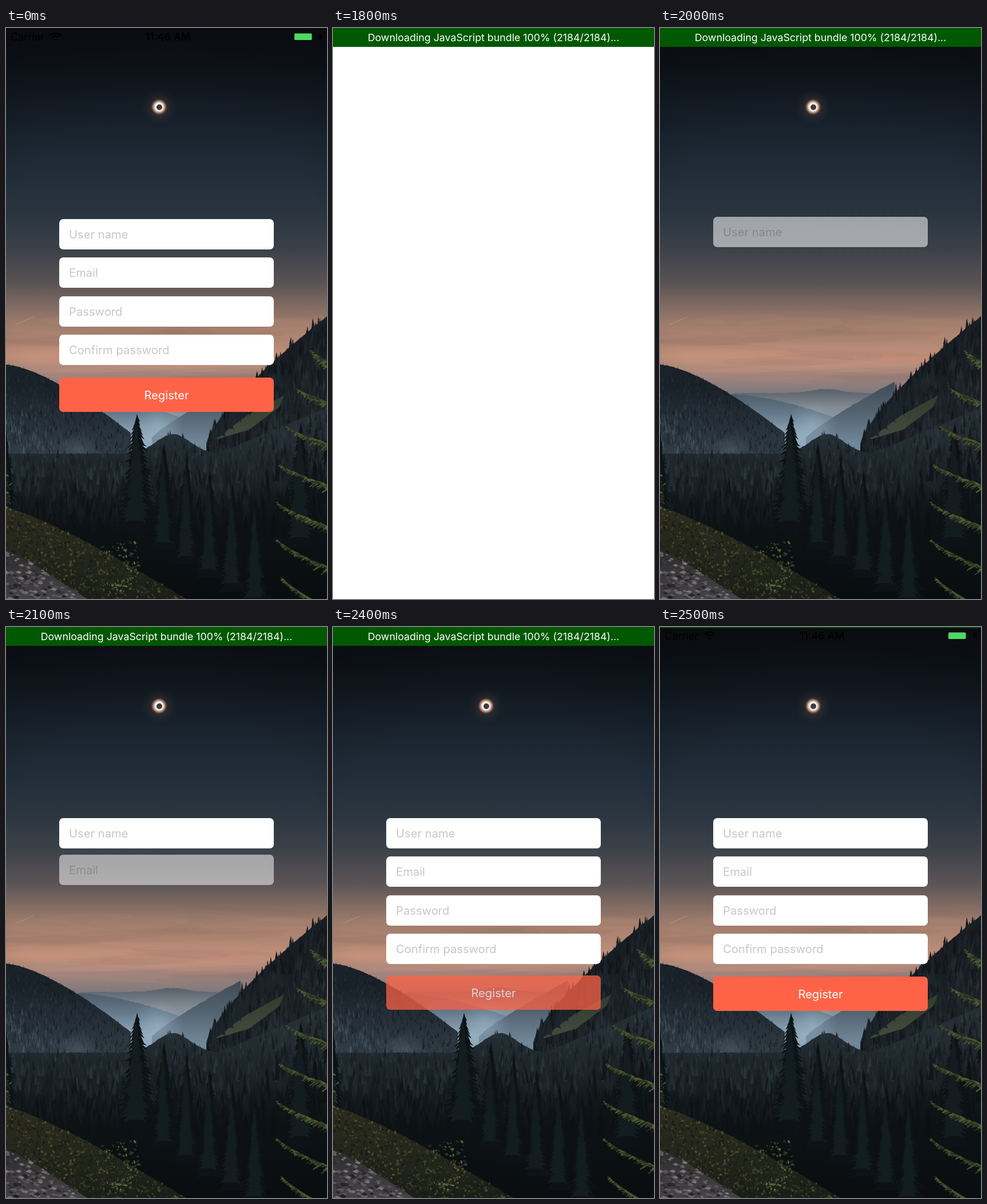
These frames come from a looping animation (561 px wide and 998 px high, 2.6 s). An HTML page with a canvas:

```html
<!DOCTYPE html>
<html lang="en">
<head>
<meta charset="utf-8">
<title>Register</title>
<style>
  html, body { margin: 0; width: 561px; height: 998px; overflow: hidden; background: #fff; }
  body { position: relative; font: 20.2px Inter, Roboto, sans-serif; }
  canvas, svg, .row, #banner { position: absolute; left: 0; top: 0; }
  .row { left: 93px; width: 375px; height: 53px; line-height: 54px; box-sizing: border-box;
    padding-left: 17px; border-radius: 7px; background: #fff; color: #c7c7cd; }
  .button { height: 60px; line-height: 61px; padding: 0; text-align: center; background: #ff6347; color: #fff; }
  #banner { width: 561px; height: 33px; line-height: 34px; text-align: center; white-space: nowrap;
    font-size: 17.8px; background: #005800; color: #fff; }
</style>
</head>
<body>
<canvas id="photo" width="561" height="998"></canvas>
<svg width="561" height="33" font-size="18">
  <text x="8" y="22">Carrier</text>
  <path d="M77 13q9.500 -8 19 0M80.500 16.500q6 -5 12 0" fill="none" stroke="#000" stroke-width="2.600"/>
  <path d="M83.500 19q3 -2.500 6 0l-3 3z"/>
  <text x="283" y="22" text-anchor="middle" font-weight="600">11:46 AM</text>
  <rect x="504" y="9.500" width="30.500" height="11.500" rx="1.500" fill="#4cd964"/>
  <path d="M551 9l-6 7h4l-2 6 7-8h-4z"/>
</svg>
<div class="row">User name</div>
<div class="row">Email</div>
<div class="row">Password</div>
<div class="row">Confirm password</div>
<div class="row button">Register</div>
<div id="banner">Downloading JavaScript bundle 100% (2184/2184)...</div>

<script>
const W = 561, H = 998, LOOP = 2600;
const photo = document.getElementById('photo');
const banner = document.getElementById('banner');
const rows = [...document.querySelectorAll('.row')];
const c = photo.getContext('2d');

let seed = 7;
const rnd = () => (seed = seed * 16807 % 2147483647) / 2147483647;
const mix = (a, b, t) => a + (b - a) * t;
const between = (a, b) => mix(a, b, rnd());
const clamp = v => Math.min(1, Math.max(0, v));
const shade = (a, b, t, k = 1) => `rgb(${a.map((v, i) => mix(v, b[i], t) * k).join()})`;

// Gradients with evenly spaced colours
function paint(gradient, colors) {
  colors.forEach((color, i) => gradient.addColorStop(i / (colors.length - 1), color));
  return gradient;
}
const vertical = (y0, y1, ...colors) => paint(c.createLinearGradient(0, y0, 0, y1), colors);

function glow(x, y, r, ...colors) {
  c.fillStyle = paint(c.createRadialGradient(x, y, 0, x, y, r), colors);
  c.fillRect(x - r, y - r, 2 * r, 2 * r);
}

function shape(points, fill) {
  c.beginPath();
  points.forEach(p => c.lineTo(...p));
  c.fillStyle = fill;
  c.fill();
}

function dot(x, y, rx, ry, turn, fill) {
  c.beginPath();
  c.ellipse(x, y, rx, ry, turn, 0, 7);
  c.fillStyle = fill;
  c.fill();
}

// A ridge is a height function over a range of x
const slope = (x0, y0, x1, y1, bend) =>
  ({ x0, x1, y: x => mix(y0, y1, clamp((x - x0) / (x1 - x0)) ** bend) });

function hill({ x0, x1, y }, fill) {
  const points = [[x1, H], [x0, H]];
  for (let x = x0; x <= x1; x += 3) points.push([x, y(x) + between(-.5, .5)]);
  shape([...points, [x1, y(x1)]], fill);
}

// Conifer with its tip at x, y
function tree(x, y, h, w, fill) {
  const n = Math.max(4, Math.round(h / 7)), left = [], right = [];
  for (let k = 1; k <= n; k++) {
    const yy = y + h * k / n;
    for (const [side, dir] of [[left, -1], [right, 1]]) {
      const r = dir * w * (k / n) ** .85 * between(.65, 1.2);
      side.push([x + r, yy + rnd() * 4], [x + r * .55, yy - 1]);
    }
  }
  shape([[x, y], ...right, ...left.reverse()], fill);
}

function forest(ridge, depth, count, size0, size1, top, low) {
  const y0 = ridge.y((ridge.x0 + ridge.x1) / 2);
  hill(ridge, vertical(y0, y0 + depth, shade(top, low, 0), shade(top, low, 1)));
  for (let i = 0; i < count; i++) {
    const t = i / count, x = between(ridge.x0, ridge.x1);
    const h = mix(size0, size1, t) * between(.6, 1.3);
    tree(x, ridge.y(x) + depth * t - h * .55, h, h * .2, shade(top, low, t, between(.6, 1.3)));
  }
}

function leaves(ridge, depth, count, dark, light) {
  for (let i = 0; i < count; i++) {
    const x = between(ridge.x0, ridge.x1);
    dot(x, ridge.y(x) + depth * rnd(), between(1, 3.5), between(1, 2), rnd() * 3, shade(dark, light, rnd() ** 2));
  }
}

// Drooping spruce branch growing in from the right edge
function branch(x, y, endY) {
  for (let i = 0; i < 150; i++) {
    const t = rnd(), px = mix(x, W + 10, t), py = mix(y, endY, t ** .8);
    const len = mix(5, 16, t) * between(.5, 1.2);
    c.strokeStyle = shade([26, 35, 27], [92, 100, 54], rnd());
    c.lineWidth = between(1, 2.2);
    c.beginPath();
    c.moveTo(px, py);
    c.lineTo(px - len * .8, py + len * between(-.5, .7));
    c.stroke();
  }
}

function sky() {
  c.fillStyle = vertical(0, 640, '#0c0d12', '#0e1219', '#131b24', '#1a2530', '#212d39',
    '#29343f', '#3a4048', '#5a5455', '#9a7a6b', '#c2917a', '#7d787c');
  c.fillRect(0, 0, W, H);
  glow(280, 420, 560, 'rgba(0,0,0,0)', 'rgba(0,0,0,0)', 'rgba(0,0,0,.26)');
  for (let i = 0; i < 30; i++) {
    const tint = rnd() < .5 ? '236,164,128' : '96,78,82';
    dot(rnd() * W, between(500, 615), between(80, 230), between(4, 12), between(-.08, .08), `rgba(${tint},.045)`);
  }
  glow(268, 138, 32, 'rgba(190,130,105,.5)', 'rgba(110,78,68,.2)', 'rgba(60,50,50,0)');
  glow(267.5, 138, 14, '#fff', '#fff', '#fff0e2', 'rgba(240,185,150,.55)', 'rgba(190,120,95,0)');
  dot(268, 138.5, 5, 5, 0, '#3a3b43');
  c.strokeStyle = 'rgba(232,160,125,.5)';
  c.beginPath();
  c.moveTo(17, 518);
  c.lineTo(48, 505);
  c.stroke();
}

function valley() {
  const far = { x0: 130, x1: 430, y: x => 638 - 7 * Math.exp(-(((x - 290) / 35) ** 2)) };
  hill(far, vertical(630, 700, '#555e69', '#858c93', '#8b9fae'));
  hill(slope(125, 640, 330, 690, 1.6), vertical(638, 712, '#4b5b69', '#657a8b', '#91a9bb'));
  hill(slope(255, 716, 410, 618, .85), vertical(618, 725, '#414b56', '#536270', '#70879a'));
  glow(265, 696, 45, 'rgba(160,184,203,.5)', 'rgba(150,176,196,0)');
}

function slopes() {
  forest(slope(0, 588, 218, 708, 1.45), 150, 1100, 7, 14, [26, 34, 41], [56, 69, 80]);
  glow(125, 742, 40, 'rgba(125,140,152,.3)', 'rgba(90,110,125,0)');
  forest(slope(350, 726, W, 504, .75), 190, 800, 26, 18, [24, 30, 35], [35, 44, 47]);
  shape([[364, 720], [420, 678], [486, 642], [478, 662], [425, 702]], vertical(640, 720, '#303c2c', '#454b3f'));
  for (let x = 364; x < 480; x += 14) tree(x, 1010 - x * .9, 44, 8, '#1b242a');
  const middle = {
    x0: 0, x1: W,
    y: x => 744 - 34 * Math.exp(-(((x - 292) / 42) ** 2)) - 80 * clamp((x - 370) / 190)
  };
  forest(middle, 170, 1300, 14, 48, [36, 46, 52], [14, 20, 22]);
}

function foreground() {
  c.fillStyle = vertical(800, H, 'rgba(11,15,17,0)', '#0c1113', '#0a0d0f');
  c.fillRect(0, 800, W, H - 800);
  const pine = (x, y, h, w) => {
    tree(x, y, h, w, '#0c1215');
    tree(x - 2, y + 14, h * .85, w * .6, 'rgba(34,46,48,.35)');
  };
  pine(0, 705, 150, 22);
  pine(515, 690, 220, 42);
  for (let i = 4; i >= 0; i--) pine(276 + 40 * i, 724 + 24 * i, 190, 30);
  pine(229, 674, 205, 44);

  const bank = slope(0, 838, 315, H, 1.2);
  hill(bank, vertical(838, H, '#2c2b1e', '#24271c', '#191e18'));
  leaves(bank, 110, 1300, [24, 27, 20], [82, 78, 46]);
  leaves(slope(165, 905, 232, 895, 1), 90, 110, [38, 44, 30], [100, 106, 62]);
  leaves(slope(0, 775, 9, 800, 1), 80, 25, [38, 44, 30], [90, 98, 56]);
  const rocks = slope(0, 912, 142, H, 1.1);
  hill(rocks, vertical(910, H, '#2b2a2b', '#454346'));
  for (let i = 0; i < 260; i++) {
    const x = rnd() * 130, y = rocks.y(x) + rnd() * 85, r = between(2, 7);
    shape([[x - r, y], [x, y - r * .5], [x + r, y], [x + r * .3, y + r * .5]],
      shade([28, 28, 29], [128, 123, 125], rnd()));
  }
  for (let i = 0; i < 7; i++) {
    const y = 565 + 66 * i;
    branch(474 + 61 * ((y - 850) / 285) ** 2, y, y + 22 + 6 * i);
  }
}

sky();
valley();
slopes();
foreground();

function draw(now) {
  const step = Math.floor(now % LOOP / 100), loading = step >= 18;
  photo.style.visibility = step === 18 || step === 19 ? 'hidden' : 'visible';
  document.body.style.background = step === 19 ? '#918f92' : '#fff';
  banner.style.visibility = loading ? 'visible' : 'hidden';
  banner.style.transform = `translateY(${step === 25 ? -31.5 : 0}px)`;
  rows.forEach((row, i) => {
    const late = step - 19 - i;
    const p = !loading ? 1 : late < 0 ? 0 : clamp((i ? 0 : .1) + late * (.45 + .07 * i));
    row.style.top = Math.round(334 + 67.4 * i + (i === 4 ? 7.4 : 0) - 8 * (1 - p)) + 'px';
    row.style.opacity = p;
  });
}

const start = performance.now();
(function tick() {
  draw(performance.now() - start);
  requestAnimationFrame(tick);
})();
</script>
</body>
</html>
```
